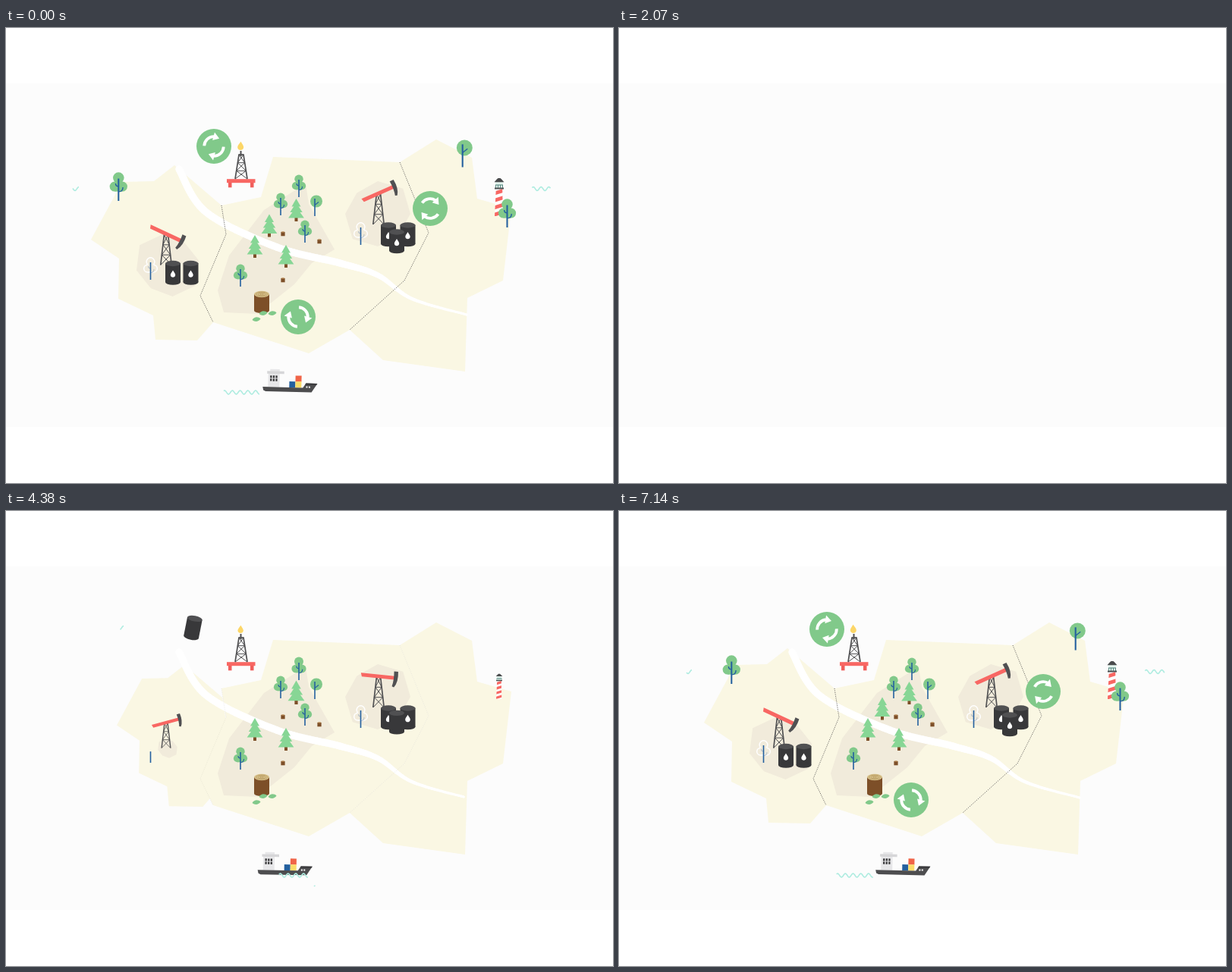
These frames come from a looping animation (800 by 600 pixels, 7.17 s). An HTML page with a canvas:

```html
<!DOCTYPE html>
<html lang="en">
<head>
<meta charset="utf-8">
<title>Resource map</title>
<style>
html, body { margin: 0; width: 100%; height: 100%; overflow: hidden; background: #fff; }
canvas { display: block; }
</style>
</head>
<body>
<canvas id="stage" width="800" height="600"></canvas>
<script>
const ctx = document.getElementById('stage').getContext('2d');
const LOOP = 7170, CUT = 2070, STEP = 30, TAU = Math.PI * 2, DEG = Math.PI / 180;
const C = {
  land: '#faf7e3', patch: '#f1ebdb', green: '#81c98a', pine: '#87d695', blue: '#24609f',
  dark: '#38383a', grey: '#505052', red: '#f86763', brown: '#7d4f28', sand: '#d8c28c',
  wave: '#aeece0', yellow: '#fcd667', white: '#fff'
};
let now = 0;

// timing
const clamp = v => Math.max(0, Math.min(1, v));
const prog = (start, dur) => clamp((now - start) / dur);
const smooth = p => p * p * (3 - 2 * p);
const ease = (start, dur) => smooth(prog(start, dur));
const back = p => p <= 0 ? 0 : 1 + 2.2 * (p - 1) ** 3 + 1.2 * (p - 1) ** 2;
const pop = (start, dur) => back(prog(start, dur));

// drawing
function at(x, y, scale, draw, angle = 0) {
  if (scale <= 0) return;
  ctx.save();
  ctx.translate(x, y);
  ctx.rotate(angle);
  ctx.scale(scale, scale);
  draw();
  ctx.restore();
}
function path(points) {
  ctx.beginPath();
  for (const [x, y] of points) ctx.lineTo(x, y);
}
function poly(color, ...points) {
  ctx.fillStyle = color;
  path(points);
  ctx.fill();
}
function line(color, width, ...points) {
  ctx.strokeStyle = color;
  ctx.lineWidth = width;
  path(points);
  ctx.stroke();
}
function oval(color, x, y, rx, ry = rx) {
  ctx.fillStyle = color;
  ctx.beginPath();
  ctx.ellipse(x, y, rx, ry, 0, 0, TAU);
  ctx.fill();
}
function rect(color, x, y, w, h) {
  ctx.fillStyle = color;
  ctx.fillRect(x, y, w, h);
}
function drop(color, w, h) {
  ctx.fillStyle = color;
  ctx.beginPath();
  ctx.moveTo(0, -h * .56);
  ctx.bezierCurveTo(w * .2, -h * .3, w * .5, -h * .08, w * .5, h * .1);
  ctx.bezierCurveTo(w * .5, h * .58, -w * .5, h * .58, -w * .5, h * .1);
  ctx.bezierCurveTo(-w * .5, -h * .08, -w * .2, -h * .3, 0, -h * .56);
  ctx.fill();
}

// ground: three lands that share two seams
const westSeam = [[284, 234], [290, 272], [256, 353], [273, 388]];
const eastSeam = [[519, 177], [557, 270], [525, 333], [453, 398]];
const west = [[252, 412], [197, 411], [194, 379], [148, 357], [149, 304], [112, 279],
  [153, 203], [195, 202], [222, 181], ...westSeam];
const east = [[497, 438], [605, 453], [608, 356], [655, 333], [666, 238], [621, 225],
  [614, 171], [567, 147], ...eastSeam];
const middle = [[352, 170], ...eastSeam, [399, 429], ...[...westSeam].reverse(), [336, 223]];
const forest = [[395, 205], [399, 232], [433, 292], [403, 310], [380, 338], [331, 377],
  [287, 375], [279, 346], [294, 300], [340, 240]];
const bed = [[228, 186], [264, 243], [357, 289], [440, 310], [490, 326], [535, 357], [607, 378]];

function grow(points, ox, oy, start, dur, color) {
  at(ox, oy, ease(start, dur), () => poly(color, ...points.map(([x, y]) => [x - ox, y - oy])));
}
// octagon stretched along one axis
function oilPatch(x, y, r, axis, start) {
  const corners = Array.from({ length: 8 }, (_, i) => {
    const a = i * TAU / 8, d = r + 4 * Math.cos(2 * a);
    return [d * Math.cos(a + axis * DEG), d * Math.sin(a + axis * DEG)];
  });
  at(x, y, ease(start, 620), () => poly(C.patch, ...corners));
}
function bedPoint(s) {
  const last = bed.length - 1, i = Math.min(Math.floor(s), last - 1), t = s - i;
  const p = n => bed[Math.max(0, Math.min(last, i + n))];
  return [0, 1].map(k => {
    const [a, b, c, d] = [p(-1)[k], p(0)[k], p(1)[k], p(2)[k]];
    return .5 * (2 * b + (c - a) * t + (2 * a - 5 * b + 4 * c - d) * t * t + (3 * b - a - 3 * c + d) * t ** 3);
  });
}
function river() {
  const last = bed.length - 1, end = ease(3450, 1000) * last;
  ctx.lineCap = 'round';
  for (let s = 0; s < end; s += .05) {
    const width = 9.5 - 6.5 * smooth(clamp(s / last * 1.7 - .7));
    line(C.white, width, bedPoint(s), bedPoint(Math.min(end, s + .05)));
  }
  ctx.lineCap = 'butt';
}
function border(seam, start) {
  ctx.globalAlpha = ease(start, 400);
  ctx.setLineDash([1, 1.5]);
  line('#55534d', 1, ...seam);
  ctx.setLineDash([]);
  ctx.globalAlpha = 1;
}

// squiggle that is drawn from right to left, then wiped the same way
function wave(x, y, start) {
  const size = 53, from = ease(start + 1332, 1750) * size, to = ease(start, 1750) * size;
  if (to - from < 1) return;
  const points = [];
  for (let d = from; d <= to; d += .5) points.push([x - d, y - 2.4 * Math.cos(d / 10.2 * TAU)]);
  line(C.wave, 1.6, ...points);
}

// plants
function cloud(color, extra) {
  oval(color, 0, -23.8, 5.7 + extra);
  for (const side of [-1, 1]) oval(color, side * 4, -14.8, 5.1 + extra);
  rect(color, -4, -20, 8, 10.3 + extra);
}
function twig(color, side, y, size) {
  ctx.strokeStyle = color;
  ctx.lineWidth = 1.1;
  ctx.beginPath();
  ctx.moveTo(0, y);
  ctx.quadraticCurveTo(side * size, y, side * size, y - size);
  ctx.stroke();
}
const crowns = {
  cloud() {
    cloud(C.green, 0);
    twig(C.blue, 1, -9.5, 4.5);
    twig(C.blue, -1, -15, 3);
  },
  bare() {
    cloud(C.white, .4);
    cloud(C.patch, -1.1);
    twig('#b9c2cb', 1, -9.5, 4.5);
    twig('#b9c2cb', -1, -15, 3);
  },
  round() {
    oval(C.green, 2, -19.5, 8);
    line(C.blue, 1.1, [0, -14.5], [5, -18.5]);
  }
};
const tree = (kind, size = 1) => (x, y, start) => {
  const trunk = ease(start, 300), base = -10;
  if (!trunk) return;
  at(x, y, size, () => {
    at(0, base, pop(start + 170, 420), () => {
      ctx.translate(0, -base);
      crowns[kind]();
    });
    line(C.blue, 1.6, [0, 0], [0, -23 * trunk]);
  });
};
function pine(x, y, start) {
  at(x, y, pop(start, 480), () => {
    rect(C.brown, -2, -6, 4, 6);
    for (let i = 0; i < 3; i++) {
      const w = 6 + 2.2 * i, top = -30 + 5.5 * i, low = -19.5 + 7.5 * i;
      poly(C.pine, [0, top], [w, low], [-w, low]);
    }
  });
}
function stump(x, y, start) {
  at(x, y + 3, pop(start, 300), () => {
    rect(C.brown, -2.6, -5, 5.2, 5.3);
    oval('#b88a56', 0, -5, 2.4, .8);
  });
}
function log() {
  at(337, 375, pop(3050, 420), () => {
    rect(C.brown, -10, -24, 20, 21.5);
    oval(C.brown, 0, -2.5, 10, 3.6);
    oval(C.sand, 0, -24, 10, 4.2);
    ctx.strokeStyle = '#b5975e';
    ctx.lineWidth = .7;
    for (let r = 2.5; r < 8; r += 2.5) {
      ctx.beginPath();
      ctx.ellipse(0, -24, r, r * .4, 0, 0, TAU);
      ctx.stroke();
    }
  });
}
// leaves hop off the log and settle beside it
function leaf(x, y, start, spin) {
  const p = prog(start, 650);
  const px = 337 + (x - 337) * Math.min(1, p * 1.9);
  const py = 351 + (y - 351) * smooth(p) - 3 * Math.sin(p * Math.PI);
  at(px, py, Math.min(1, p * 4), () => {
    ctx.fillStyle = C.green;
    ctx.beginPath();
    ctx.moveTo(-5.5, 1);
    ctx.bezierCurveTo(-3, -4, 3, -3.5, 5.5, -.5);
    ctx.bezierCurveTo(3, 3.5, -2, 4, -5.5, 1);
    ctx.fill();
  }, spin * (1 - p));
}

// machines
function tower(height, w1, w2, rows) {
  const side = (k, s) => [s * (w2 + (w1 - w2) * k), -height * k];
  line(C.grey, 1.7, side(0, -1), side(1, -1), side(1, 1), side(0, 1));
  for (let i = 0; i < rows; i++) {
    const a = i / rows, b = (i + 1) / rows;
    for (const s of [-1, 1]) line(C.grey, 1, side(a, s), side(b, -s));
    line(C.grey, 1, side(b, -1), side(b, 1));
  }
}
function pump(x, y, start, angle) {
  const k = pop(start, 450);
  at(x, y + 41, k, () => tower(40, 2.6, 7.2, 3));
  at(x, y + 41 * (1 - k), k, () => {
    poly(C.red, [-23.5, -2.5], [21, -2.5], [21, 2.5], [-22, 2.5]);
    ctx.fillStyle = C.grey;
    ctx.beginPath();
    ctx.moveTo(19.8, -8.5);
    ctx.lineTo(25.2, -8.5);
    ctx.quadraticCurveTo(27, 5, 21.5, 12.5);
    ctx.lineTo(18.8, 11.5);
    ctx.quadraticCurveTo(21, 3, 19.8, -8.5);
    ctx.fill();
  }, angle * DEG);
}
const swing = (peak, mid, amp) => mid + amp * Math.cos((now - peak) / 1050 * Math.PI);

// falls in, bounces once, then shows its mark
function barrel(x, y, start) {
  if (now < start) return;
  const air = 1 - prog(start, 500) ** 2, hop = prog(start + 500, 260);
  at(x + 4 * air, y - 225 * air - 26 * hop * (1 - hop), 1, () => {
    rect(C.dark, -10, -12.3, 20, 25);
    oval(C.dark, 0, 12.6, 10, 3.6);
    oval(C.grey, 0, -12, 10, 3.7);
    at(0, 2, pop(start + 560, 320), () => drop(C.white, 6.4, 9));
  }, .26 * air);
}
function rig() {
  at(310, 204, pop(3560, 300), () => {
    rect(C.red, -19, -4.8, 37.5, 5);
    for (const x of [-17, 12]) rect('#f05f5c', x, 0, 4.5, 6.3);
  });
  at(310, 199, pop(3880, 450), () => {
    tower(32, 3, 8, 3);
    line(C.grey, 2, [-.5, -37], [-.5, -30]);
  });
  const sway = .32 * Math.sin((now - 7155) / 697.5 * TAU);
  at(309, 161, pop(4250, 350), () => {
    ctx.translate(0, -5);
    drop(C.yellow, 8, 11);
  }, sway);
}
function lighthouse() {
  at(650, 247, pop(4280, 480), () => {
    ctx.save();
    path([[-4.2, -35], [4.2, -35], [5, 1], [-6, 1]]);
    ctx.clip();
    rect(C.white, -8, -36, 16, 38);
    for (let y = -33; y < 3; y += 9.4) poly(C.red, [-8, y + 2], [8, y - 3], [8, y + 2], [-8, y + 7]);
    ctx.restore();
    rect('#e4f4ee', -5, -44, 10, 7);
    rect('#4a4d4e', -6, -36.5, 12, 2);
    line('#4d7f78', 1, [-5, -40], [5, -40]);
    for (let x = -4.5; x < 5; x += 3) line('#4d7f78', .9, [x, -40], [x, -36]);
    poly('#4a4b4d', [-6.5, -43.8], [-3.2, -47.5], [-1.5, -49], [1.5, -49], [3.2, -47.5], [6.5, -43.8]);
  });
}
function boat(left) {
  const tilt = -2.2 * Math.sin((now - 5010) / 3540 * TAU) * ease(3600, 1500);
  at(left + 36, 478, pop(2440, 480), () => {
    ctx.translate(-36, -478);
    rect('#e7e7e9', 7, 456, 15, 18);
    rect('#e7e7e9', 9.5, 450.3, 12.5, 3);
    rect('#d6d6d8', 5.5, 453, 22.5, 3.4);
    for (let i = 0; i < 6; i++) rect(C.dark, 9.6 + i % 3 * 3.6, i < 3 ? 458.8 : 463, 2.3, 3.2);
    rect(C.blue, 35, 466, 8, 8);
    rect('#f06448', 43, 458.2, 8, 8);
    rect('#fbdc6a', 43, 466, 8, 8);
    poly('#4d4d4f', [0, 474], [53, 474], [57, 468], [72, 468], [64.5, 479.8], [4, 479.8], [1, 478.3]);
    poly(C.dark, [57, 468], [72, 468], [70.8, 470], [55.8, 470]);
    for (const x of [57.2, 60.6]) rect(C.white, x, 472, 2, 2);
  }, tilt * DEG);
}
// phase is the arrow angle in degrees when the loop wraps
function recycle(x, y, start, phase, speed) {
  const turn = Math.max(195, phase + speed * (now - LOOP) / 1000) * DEG;
  at(x, y, ease(start, 400), () => {
    oval(C.green, 0, 0, 23);
    ctx.rotate(turn);
    for (let i = 0; i < 2; i++) {
      ctx.rotate(Math.PI);
      ctx.strokeStyle = C.white;
      ctx.lineWidth = 3.8;
      ctx.beginPath();
      ctx.arc(0, 0, 12.8, -1.75, -.22);
      ctx.stroke();
      poly(C.white, [7.4, -3.6], [18.2, -3.2], [11.6, 4.6]);
    }
  });
}

const cloudTree = tree('cloud'), bareTree = tree('bare');
const grove = [[cloudTree, 309, 341], [pine, 328, 303], [tree('round'), 407, 248], [cloudTree, 362, 247],
  [cloudTree, 394, 283], [pine, 369, 316], [cloudTree, 386, 223], [pine, 382.5, 255]];
const barrels = [[504, 272], [529.5, 272], [515, 281], [243.5, 322.5], [220, 322.5]];

function scene() {
  grow(middle, 272, 428, 2420, 930, C.land);
  grow(east, 463, 305, 3250, 1000, C.land);
  grow(west, 290, 297, 3660, 1000, C.land);
  grow(forest, 345, 310, 2640, 700, C.patch);
  oilPatch(490, 245, 43, 135, 2800);
  oilPatch(213, 313, 41.5, 36, 4150);
  river();
  border(westSeam, 4300);
  border(eastSeam, 4300);

  wave(155, 154, 4056);
  wave(155, 154, LOOP + 794);
  wave(96, 212, 6733);
  wave(746, 212, 4918);
  wave(746, 271, LOOP + 420);
  wave(407.5, 496.5, 4193);
  const left = 330.3 + .00236 * (now - 3840);
  boat(left);
  wave(left + 81, 480.5, 2440);
  wave(left + 1, 480.5, 5499);
  wave(left + 81, 480.5, LOOP + 315);

  rig();
  lighthouse();
  stump(365, 271, 3120);
  stump(413, 281, 3180);
  stump(365, 332, 3240);
  grove.forEach(([plant, x, y], i) => plant(x, y, 3150 + 130 * i));
  pine(347, 275.5, 4890);
  tree('cloud', 1.28)(660.5, 263, 4690);
  tree('round', 1.31)(601.7, 183.5, 4860);
  tree('cloud', 1.28)(148.3, 228, 5560);
  log();
  leaf(330, 384, 3480, -2.6);
  leaf(351, 376, 3540, 1);
  leaf(339, 376, 3660, -.6);

  pump(211, 271.5, 4250, swing(7155, -3, 28));
  pump(491, 218, 3050, swing(6035, 0, 24.5));
  bareTree(190.5, 332, 4200);
  bareTree(467.5, 286, 3150);
  barrels.forEach(([x, y], i) => barrel(x, y, 3290 + 280 * i));

  recycle(385, 381, 5400, 185, 227);
  recycle(559, 238, 5470, 315, 199);
  recycle(274, 156, 5600, 283, 199);
}

function frame(time) {
  const t = Math.floor(time % LOOP / STEP) * STEP;
  now = t < CUT ? t + LOOP : t;
  rect(C.white, 0, 0, 800, 600);
  ctx.save();
  ctx.beginPath();
  ctx.rect(0, 73, 800, 453);
  ctx.clip();
  rect('#fcfcfc', 0, 73, 800, 453);
  if (now >= 2430) scene();
  ctx.restore();
}

const begin = performance.now();
function tick() {
  frame(performance.now() - begin);
  requestAnimationFrame(tick);
}
tick();
</script>
</body>
</html>
```
